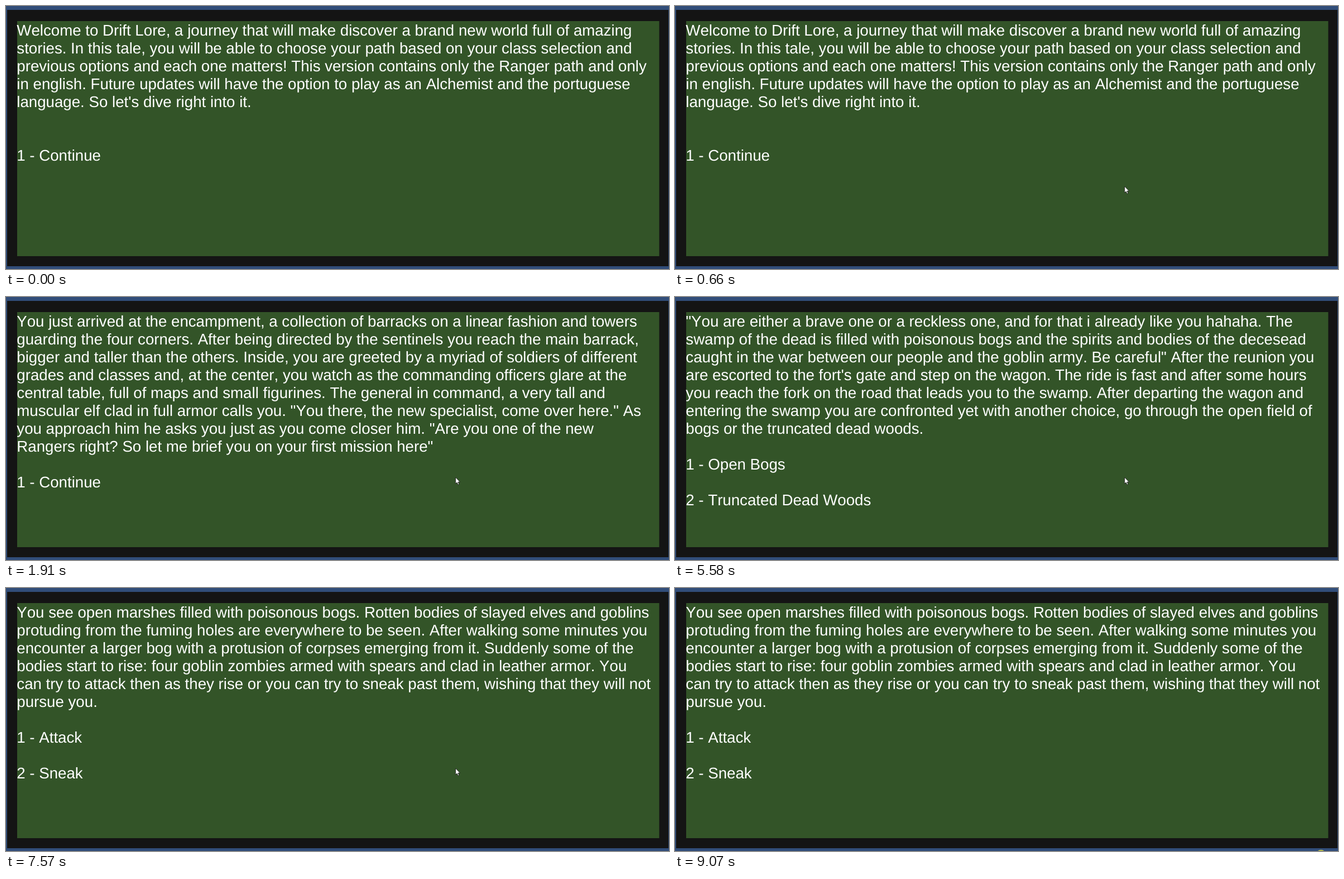
Animation of 1188x471 px, one loop 9.15 s. Source, as an HTML page:

```html
<!DOCTYPE html>
<html lang="en">
<head>
<meta charset="utf-8">
<title>Text adventure</title>
<style>
  html, body { margin: 0; width: 100%; height: 100%; overflow: hidden; background: #314d79; }
  svg { display: block; width: 100vw; height: 100vh; }
  text {
    font: 27.66px "Liberation Sans", Arial, sans-serif;
    font-kerning: none;
    font-variant-ligatures: none;
    text-rendering: geometricPrecision;
    fill: #fff;
  }
</style>
</head>
<body>
<svg viewBox="0 0 1188 471">
  <rect width="1188" height="471" fill="#314d79"/>
  <rect x="2" y="7" width="1185" height="459" fill="#141414"/>
  <rect x="20" y="27" width="1150.5" height="421" fill="#335428"/>
  <g id="page"></g>
  <circle id="highlight" cx="1157.5" cy="477.6" r="8.8" fill="#b4b84c"/>
  <path id="cursor" d="M0 0V11.4L2.6 9L4.4 13.2L6.3 12.4L4.5 8.3H8Z"
        fill="#fff" stroke="#111" stroke-width=".8" stroke-linejoin="round"/>
</svg>
<script>
const LOOP = 9150;
const LEFT = 19.3, BASELINE = 53, LINE_HEIGHT = 32;

const pages = [
  { start: 0, text: `Welcome to Drift Lore, a journey that will make discover a brand new world full of amazing
stories. In this tale, you will be able to choose your path based on your class selection and
previous options and each one matters! This version contains only the Ranger path and only
in english. Future updates will have the option to play as an Alchemist and the portuguese
language. So let's dive right into it.


1 - Continue` },
  { start: 1910, text: `You just arrived at the encampment, a collection of barracks on a linear fashion and towers
guarding the four corners. After being directed by the sentinels you reach the main barrack,
bigger and taller than the others. Inside, you are greeted by a myriad of soldiers of different
grades and classes and, at the center, you watch as the commanding officers glare at the
central table, full of maps and small figurines. The general in command, a very tall and
muscular elf clad in full armor calls you. "You there, the new specialist, come over here." As
you approach him he asks you just as you come closer him. "Are you one of the new
Rangers right? So let me brief you on your first mission here"

1 - Continue` },
  { start: 2760, text: `As you know, we came to this region to estabilish an safe haven inside enemy territory. But
we cannot be at peace if our borders are in danger. So you mission is to venture outside our
fort, trespass either the swamp of the dead or the forest of the nymphs and reach our
entrepost at either territories's edge where you will deliver a letter with critical info that will
help the watchtower unit to fortify their defenses. We can grant you a ride to the entrance of
either location but you must choose. So, which one it will be?

1 - Swamp of the Dead

2 - Forest of the nymphs` },
  { start: 5580, text: `"You are either a brave one or a reckless one, and for that i already like you hahaha. The
swamp of the dead is filled with poisonous bogs and the spirits and bodies of the decesead
caught in the war between our people and the goblin army. Be careful" After the reunion you
are escorted to the fort's gate and step on the wagon. The ride is fast and after some hours
you reach the fork on the road that leads you to the swamp. After departing the wagon and
entering the swamp you are confronted yet with another choice, go through the open field of
bogs or the truncated dead woods.

1 - Open Bogs

2 - Truncated Dead Woods` },
  { start: 7570, text: `You see open marshes filled with poisonous bogs. Rotten bodies of slayed elves and goblins
protuding from the fuming holes are everywhere to be seen. After walking some minutes you
encounter a larger bog with a protusion of corpses emerging from it. Suddenly some of the
bodies start to rise: four goblin zombies armed with spears and clad in leather armor. You
can try to attack then as they rise or you can try to sneak past them, wishing that they will not
pursue you.

1 - Attack

2 - Sneak` }
];

// The pointer moves in discrete steps: in from the lower right, then out again.
const ENTER = { start: 120, end: 660, steps: 7 };
const EXIT = { start: 7910, end: 8720, steps: 11 };
const REST = [805.6, 323], OUT = [1145, 463];
const entry = [[991, 450], [917, 423], [851, 374], [816, 336], [799, 319], [796.6, 315.6], [801, 319], REST];

const svgNS = "http://www.w3.org/2000/svg";
const byId = id => document.getElementById(id);
const page = byId("page"), cursor = byId("cursor"), highlight = byId("highlight");
const show = (node, on) => node.setAttribute("visibility", on ? "visible" : "hidden");
const mix = (a, b, p) => a + (b - a) * p;
const stepAt = (t, { start, end, steps }) =>
  Math.min(steps, Math.floor((t - start) / (end - start) * steps + 1e-6));

function drawPage({ text }) {
  page.replaceChildren(...text.split("\n").map((line, i) => {
    const node = document.createElementNS(svgNS, "text");
    node.setAttribute("x", LEFT);
    node.setAttribute("y", BASELINE + i * LINE_HEIGHT);
    node.textContent = line;
    return node;
  }));
}

function cursorAt(t) {
  if (t < ENTER.start || t >= EXIT.end) return null;
  if (t < ENTER.end) return entry[stepAt(t, ENTER)];
  if (t < EXIT.start) return REST;
  const p = (stepAt(t, EXIT) + 1) / EXIT.steps;
  const eased = p * p * (3 - 2 * p);
  return REST.map((v, i) => mix(v, OUT[i], eased));
}

let current;
function render(t) {
  const next = pages.findLast(p => t >= p.start);
  if (next !== current) drawPage(current = next);
  const pos = cursorAt(t);
  show(cursor, pos);
  if (pos) cursor.setAttribute("transform", `translate(${pos})`);
  show(highlight, t >= 9070);
}

const origin = performance.now();
function tick() {
  render((performance.now() - origin) % LOOP);
  requestAnimationFrame(tick);
}
tick();
</script>
</body>
</html>
```
